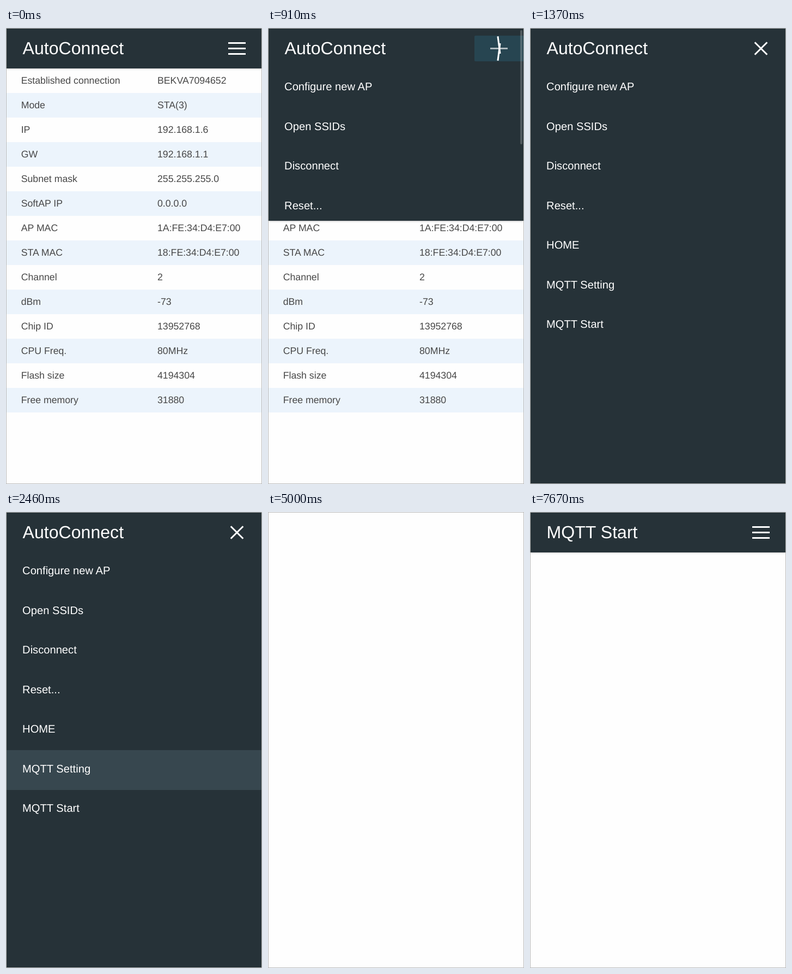
These frames come from a looping animation (470 by 835 pixels, 8000 ms). An HTML page:

```html
<!DOCTYPE html>
<html lang="en">
<head>
<meta charset="utf-8">
<title>AutoConnect</title>
<style>
@property --p { syntax: "<number>"; inherits: true; initial-value: 0; }

html, body { margin: 0; width: 100%; height: 100%; overflow: hidden; }
.stage {
  position: relative; width: 470px; height: 835px; overflow: hidden;
  background: #fefefe; font-family: "Liberation Sans", Arial, sans-serif;
}
.stage::after {
  content: ""; position: absolute; inset: 0; border: 1px solid #bbb;
}
svg { position: absolute; left: 0; top: 0; text-rendering: geometricPrecision; }
.bar svg { left: -1px; top: -1px; }

.table { font-size: 17.7px; fill: #474747; }
.stripe { fill: #ecf4fc; }
.note { font-size: 20.15px; fill: #111; }
.button { fill: #1b5e20; }
.caption { font-size: 17.87px; letter-spacing: 1.07px; font-kerning: none; fill: #fff; }
.title { font-size: 32.1px; fill: #fff; }
.item { font-size: 20.15px; fill: #fff; }

.bar {
  position: absolute; left: 1px; top: 1px; width: 468px;
  height: calc(73px + 760px * var(--p));
  overflow: hidden; background: #263238;
  box-shadow: 0 1.3px 4px rgba(0,0,0,.12), 0 1.3px 2.7px rgba(0,0,0,.24);
}
.line { fill: #fff; transform-box: fill-box; transform-origin: center; }
.top { transform: translateY(calc(10px * var(--p))) rotate(calc(225deg * var(--p))); }
.mid { opacity: calc(1 - var(--p)); }
.low { transform: translateY(calc(-10px * var(--p))) rotate(calc(-225deg * var(--p))); }
.tap { fill: #33b5e5; }
.thumb { fill: #fff; }

/* One loop is 8 s, so 1% is 80 ms; every change is a hard step. */
.bar, .info, .setting, .saved, .t1, .t2, .t3, .tap, .thumb, .pick {
  animation: 8s step-end infinite;
}
.bar { animation-name: open, load; }
.info, .t1 { animation-name: first; }
.setting { animation-name: setting; }
.saved { animation-name: saved; }
.t2 { animation-name: second; }
.t3 { animation-name: third; }
.tap { animation-name: tap; }
.thumb { animation-name: thumb; }
.pick { animation-name: pick; }

@keyframes open {
  0% { --p: 0; }
  11.375% { --p: .367; }
  12.375% { --p: .745; }
  13.375% { --p: .918; }
  14.25% { --p: .992; }
  15.25% { --p: 1; }
  42.125%, 100% { --p: 0; }
}
@keyframes load {
  0% { visibility: visible; }
  62.5% { visibility: hidden; }
  69.375%, 100% { visibility: visible; }
}
@keyframes first { 0% { opacity: 1; } 42.125%, 100% { opacity: 0; } }
@keyframes second { 0% { opacity: 0; } 42.125% { opacity: 1; } 95.875%, 100% { opacity: 0; } }
@keyframes third { 0% { opacity: 0; } 95.875%, 100% { opacity: 1; } }
@keyframes setting { 0% { opacity: 0; } 42.125% { opacity: 1; } 62.5%, 100% { opacity: 0; } }
@keyframes saved { 0% { opacity: 0; } 69.375% { opacity: 1; } 95.875%, 100% { opacity: 0; } }
@keyframes tap {
  0% { opacity: 0; }
  10.375% { opacity: .25; }
  11.375% { opacity: .15; }
  12.375% { opacity: .06; }
  13.375%, 100% { opacity: 0; }
}
@keyframes thumb { 0% { opacity: 0; } 11.375% { opacity: .2; } 12.375%, 100% { opacity: 0; } }
@keyframes pick {
  0% { fill: #263238; }
  26.75% { fill: #375664; }
  28.375% { fill: #37474f; }
  42.125%, 100% { fill: #263238; }
}
</style>
</head>
<body>
<div class="stage">
  <svg width="470" height="835">
    <g class="info table" id="table"></g>
    <g class="setting">
      <text class="note" x="27.7" y="112">MQTT broker settings</text>
      <text class="note" x="27.7" y="135">Publishing the WiFi...</text>
      <rect class="button" x="44" y="155" width="88" height="43" rx="2"/>
      <text class="caption" x="62" y="182">SAVE</text>
    </g>
    <g class="saved">
      <text class="note" x="27.7" y="112">Save parameters</text>
      <rect class="button" x="44" y="132" width="99" height="43" rx="2"/>
      <text class="caption" x="62" y="159">START</text>
    </g>
  </svg>
  <div class="bar">
    <svg width="470" height="835">
      <rect class="pick" x="1" y="436" width="468" height="73"/>
      <g class="item" id="menu"></g>
      <g class="title">
        <text class="t1" x="30.6" y="48">AutoConnect</text>
        <text class="t2" x="30.6" y="48">MQTT Setting</text>
        <text class="t3" x="30.6" y="48">MQTT Start</text>
      </g>
      <rect class="tap" x="379" y="14" width="92" height="47" rx="2"/>
      <rect class="line top" x="408" y="26" width="32" height="3"/>
      <rect class="line mid" x="408" y="36" width="32" height="3"/>
      <rect class="line low" x="408" y="46" width="32" height="3"/>
      <rect class="thumb" x="463" y="4" width="4" height="209" rx="2"/>
    </svg>
  </div>
</div>
<script>
const rows = [
  ["Established connection", "BEKVA7094652"],
  ["Mode", "STA(3)"],
  ["IP", "192.168.1.6"],
  ["GW", "192.168.1.1"],
  ["Subnet mask", "255.255.255.0"],
  ["SoftAP IP", "0.0.0.0"],
  ["AP MAC", "1A:FE:34:D4:E7:00"],
  ["STA MAC", "18:FE:34:D4:E7:00"],
  ["Channel", "2"],
  ["dBm", "-73"],
  ["Chip ID", "13952768"],
  ["CPU Freq.", "80MHz"],
  ["Flash size", "4194304"],
  ["Free memory", "31880"]
];
const items = ["Configure new AP", "Open SSIDs", "Disconnect", "Reset...",
  "HOME", "MQTT Setting", "MQTT Start"];

const text = (x, y, s) => `<text x="${x}" y="${y}">${s}</text>`;

document.getElementById("table").innerHTML = rows.map(([name, value], i) => {
  const y = 74 + 45 * i;
  const stripe = i % 2 ? `<rect class="stripe" x="1" y="${y}" width="468" height="45"/>` : "";
  return stripe + text(27.7, y + 28, name) + text(278, y + 28, value);
}).join("");

document.getElementById("menu").innerHTML =
  items.map((s, i) => text(30.1, Math.round(114 + 72.5 * i), s)).join("");
</script>
</body>
</html>
```
